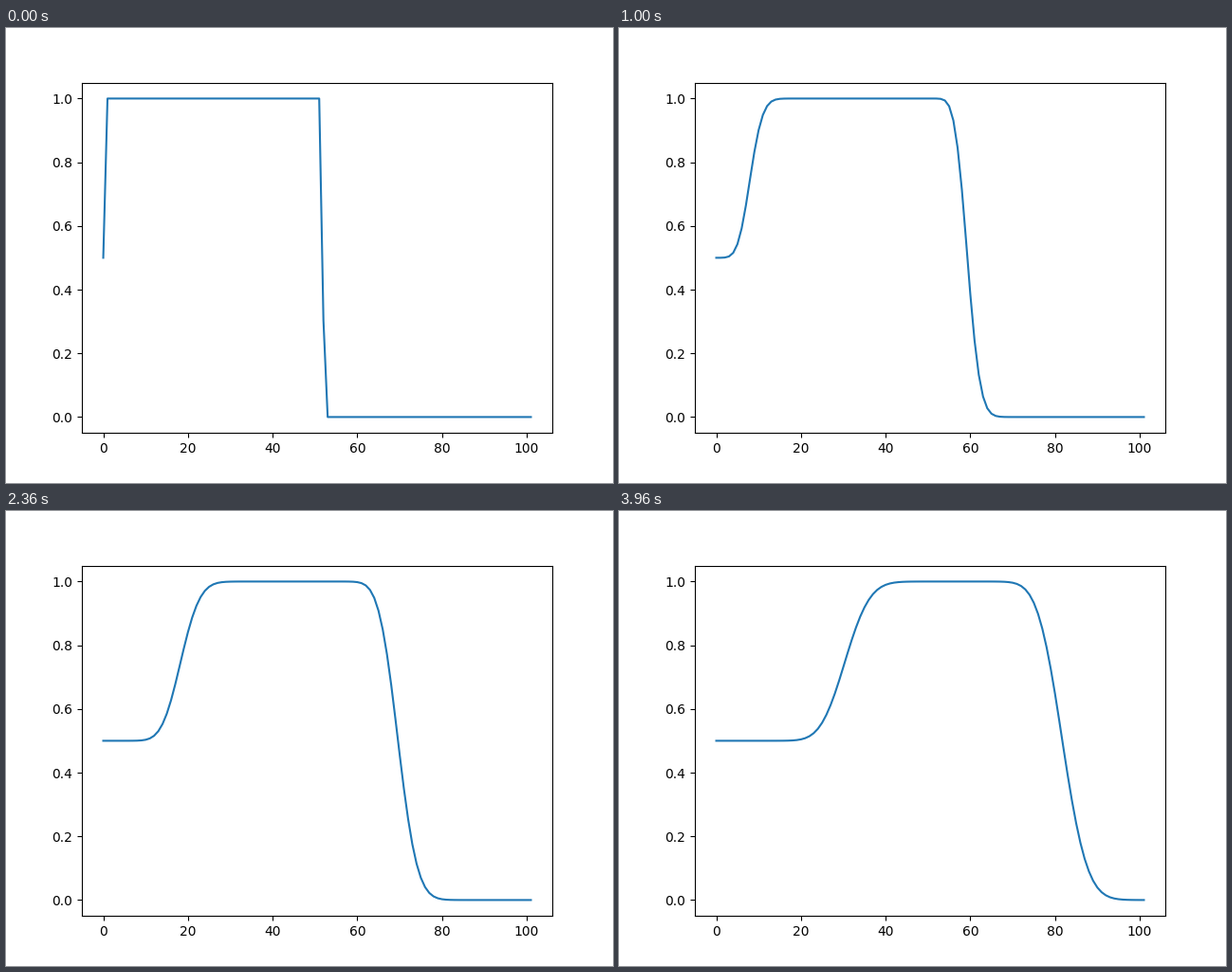
These frames come from a looping animation (640 by 480 pixels, 4 s). A matplotlib script:

```python
import numpy as np
import matplotlib.pyplot as plt
from matplotlib.animation import FuncAnimation

CELLS = 102
FRAMES = 100
COURANT = 0.303
INFLOW = 0.5


def advect(u):
    """One first-order upwind step with a fixed inflow value."""
    new = u.copy()
    new[1:] -= COURANT * (u[1:] - u[:-1])
    new[0] = INFLOW
    return new


x = np.arange(CELLS)
u = np.where(x < 52, 1.0, 0.0)
history = []
for _ in range(FRAMES):
    u = advect(u)
    history.append(u)

plt.rcParams["font.family"] = "DejaVu Sans"
fig, ax = plt.subplots(figsize=(6.4, 4.8), dpi=100)
line, = ax.plot(x, history[0], color="#1f77b4", lw=1.5)
ax.set_xlim(-5.05, 106.05)
ax.set_ylim(-0.05, 1.05)


def update(i):
    line.set_ydata(history[i])
    return line,


anim = FuncAnimation(fig, update, frames=FRAMES, interval=40,
                     repeat=True, repeat_delay=0)
plt.show()
```
